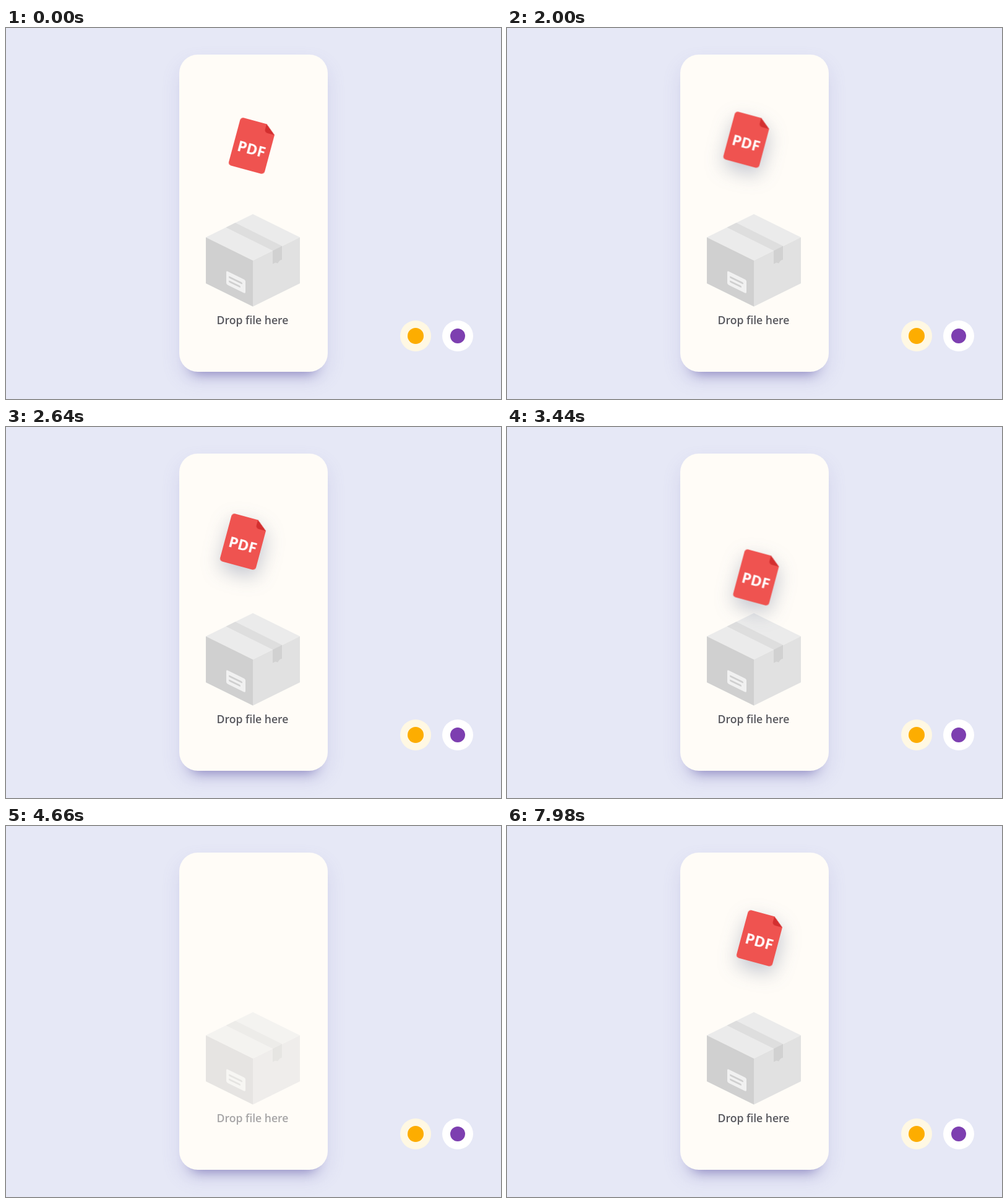
An HTML page that plays this animation: 800 px wide and 600 px high, repeating every 8 s.

```html
<!DOCTYPE html>
<html lang="en">
<head>
<meta charset="utf-8">
<title>Drop file</title>
<style>
  html, body { margin: 0; width: 100%; height: 100%; overflow: hidden; background: #e6e8f6; }
  .card {
    position: absolute; left: 280px; top: 43px; width: 240px; height: 513px;
    border-radius: 30px; background: #fffcf7;
    box-shadow: 0 22px 20px -20px rgba(75, 65, 150, .58), 0 14px 30px rgba(120, 115, 190, .16);
  }
  svg { position: absolute; left: 0; top: 0; }
  text { font-family: "Open Sans", "Noto Sans", sans-serif; text-anchor: middle; }
  .hint { font-size: 17.6px; font-weight: 600; fill: #58585e; }
  .tag { font-size: 24px; font-weight: 700; fill: #fff; }

  .drag, .lift, .target { animation: 8s linear infinite; }
  .drag { animation-name: drag; }
  .lift { animation-name: lift, drop; }
  .target { animation-name: settle; }

  /* hand-driven path of the file */
  @keyframes drag {
    0%, 21.25% { transform: translate(0, 0); }
    21.5%  { transform: translate(-1px, -2px); }
    23.75% { transform: translate(-7px, -7px); }
    26%    { transform: translate(-13px, -12px); }
    27.25% { transform: translate(-14.5px, -13px); }
    28%    { transform: translate(-14px, -12px); }
    29.75% { transform: translate(-12px, -9px); }
    31.25%, 31.5% { transform: translate(-10px, -6px); }
    33%, 37.5% { transform: translate(-14px, -5px); }
    40.5%, 42.75% { transform: translate(6px, 47px); }
    46.5%, 48.75% { transform: translate(-2px, 129px); }
    49%    { transform: translate(0, 131px); }
    50%, 75.249% { transform: translate(0, 140px); }
    75.25%, 93.5% { transform: translate(0, 0); }
    96.5%, 99.5% { transform: translate(11px, -10px); }
    99.75%, 100% { transform: translate(11px, -9px); }
  }
  /* shadow while the file is held */
  @keyframes lift {
    0%, 15.25% { filter: drop-shadow(0 12px 16px rgba(45, 65, 110, 0)); }
    17.75%, 75.249% { filter: drop-shadow(0 12px 16px rgba(45, 65, 110, .29)); }
    75.25%, 93.5% { filter: drop-shadow(0 12px 16px rgba(45, 65, 110, 0)); }
    96%, 100% { filter: drop-shadow(0 12px 16px rgba(45, 65, 110, .29)); }
  }
  @keyframes drop {
    0%, 52% { opacity: 1; }
    55%, 75.249% { opacity: 0; }
    75.25%, 100% { opacity: 1; }
  }
  @keyframes settle {
    0% { opacity: 1; }
    52% { opacity: 1; animation-timing-function: ease-out; }
    59.75%, 75.249% { opacity: .5; }
    75.25%, 100% { opacity: 1; }
  }
</style>
</head>
<body>
<div class="card"></div>
<svg width="800" height="600" viewBox="0 0 800 600">
  <g class="target">
    <path fill="#ebebeb" d="M399 301 475 338.5 399 376 323 338.5z"/>
    <path fill="#d0d0d0" d="M323 338.5 399 376V450.5L323 413z"/>
    <path fill="#e1e1e1" d="M399 376 475 338.5V413L399 450.5z"/>
    <path fill="#dedede" d="M355.500 322.500 370.500 315 446 352.500 431 360z"/>
    <path fill="#d1d1d1" d="M431 360 446 352.500V374.500L442.500 376 439 380.500 435.500 379.500 431 381.500z"/>
    <g transform="translate(356 392.500) skewY(26)">
      <rect width="31" height="22" rx="2.500" fill="#f1f1f1"/>
      <path d="M5.500 8H24.500M5.500 15H21.500" stroke="#cfcfcf" stroke-width="3" stroke-linecap="round"/>
    </g>
    <text class="hint" x="398.500" y="479">Drop file here</text>
  </g>

  <g class="drag">
    <g class="lift">
      <g transform="translate(398.200 190.500) rotate(15)">
        <path fill="#ef5350" d="M-25-40H13L30-26V35a5 5 0 0 1-5 5H-25a5 5 0 0 1-5-5V-35a5 5 0 0 1 5-5z"/>
        <path fill="#d32f2f" d="M13-40 30-26H18a5 5 0 0 1-5-5z"/>
        <text class="tag" x="0" y="14">PDF</text>
      </g>
    </g>
  </g>

  <circle cx="662" cy="498" r="25" fill="#fff8e3"/>
  <circle cx="662" cy="498" r="13" fill="#fdad00"/>
  <circle cx="730" cy="498" r="25" fill="#fff"/>
  <circle cx="730" cy="498" r="12" fill="#7d3fb0"/>
</svg>
</body>
</html>
```
